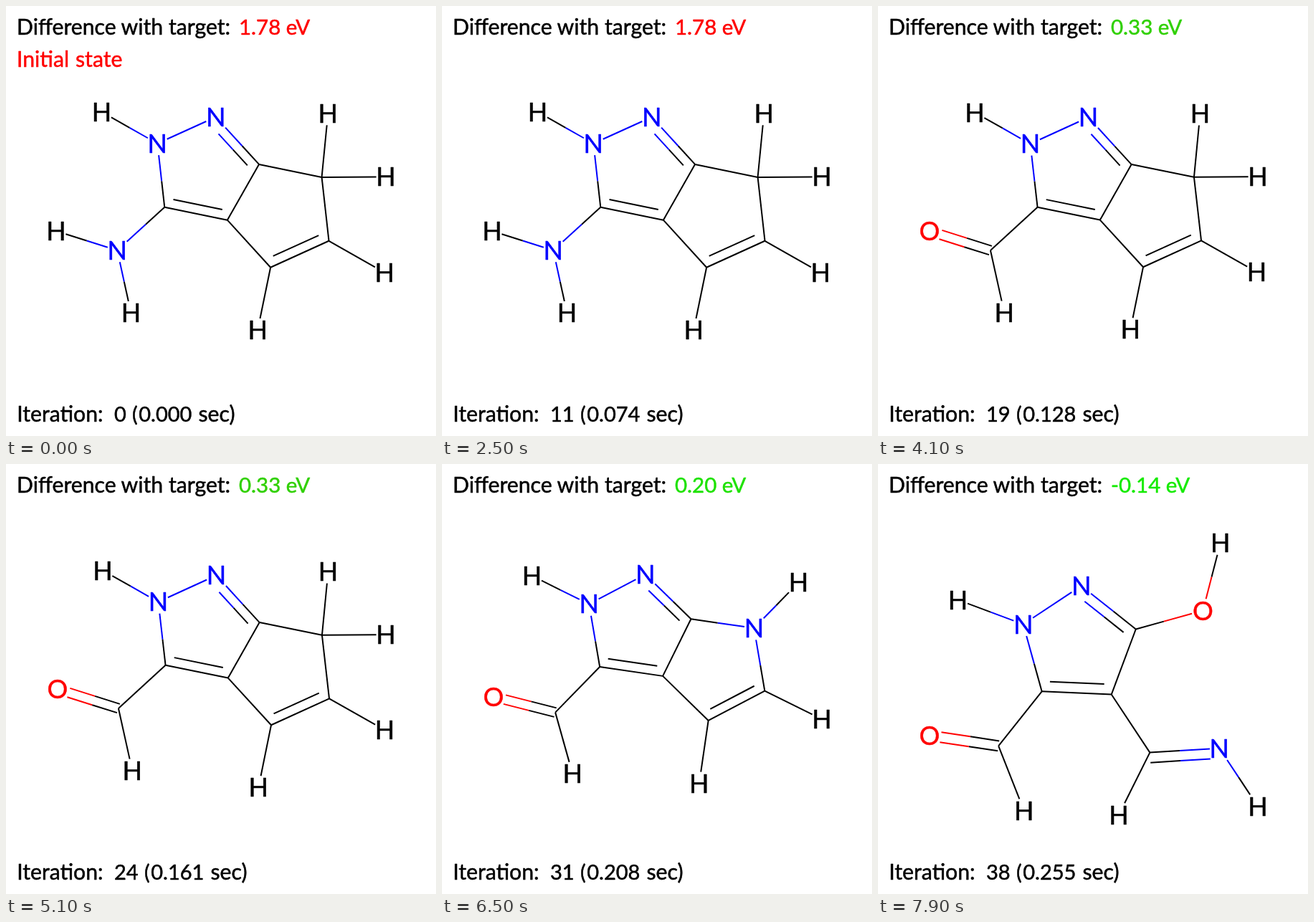
Write an HTML page with a canvas that moves like this. It is 600 px wide and 600 px high and loops after 8000 ms.

```html
<!DOCTYPE html>
<html lang="en">
<head>
<meta charset="utf-8">
<title>Molecule search</title>
<style>
  html, body { margin: 0; width: 100%; height: 100%; overflow: hidden; background: #fff; }
  canvas { display: block; width: 600px; height: 600px; }
</style>
</head>
<body>
<canvas id="stage" width="600" height="600"></canvas>
<script>
const ctx = document.getElementById('stage').getContext('2d');
const LOOP = 8000, FIRST = 500, STEP = 200, SEC_PER_STEP = 0.00672;
const WORST = 1.78;
const COLORS = { N: '#0000ff', O: '#ff0000', H: '#000', C: '#000' };
const HALF_WIDTH = { N: 10, O: 12, H: 10, C: 0 };

// Each atom: element, parent, bond mark, bond angle. All bonds have length 1.
// Marks: - single, = centred double, < and > ring double (left, right), / one-sided double
const PYRAZOLE = 'C, C 0 < 0, C 1 - -72, N 2 < -144, N 3 - 144, H 4 - 198, ';
const AMINE = 'N 0 - 126, H 6 - 186, H 6 - 66, ';
const ALDEHYDE = 'C 0 - 126, O 6 = 186, H 6 - 66, ';
const CYCLOPENTADIENE = 'C 2 - 0, C 9 - 72, C 10 > 144, H 10 - 18, H 11 - 90, H 9 - -96, H 9 - -12';
const PYRROLE = 'N 2 - 0, C 9 - 72, C 10 > 144, H 10 - 18, H 11 - 90, H 9 - -54';
const OPENED = 'O 2 - -18, C 1 - 54, N 10 / -6, H 11 - 54, H 10 - 114, H 9 - -78';
const ONE_RING = [[4, 0]], TWO_RINGS = [[4, 0], [11, 1]];

// Scales the atoms so that their labels fill x = 60..540, centred vertically
function fit(atoms) {
  const byX = [...atoms].sort((p, q) => p.x - q.x);
  const first = byX[0], last = byX[byX.length - 1];
  const left = 60 + HALF_WIDTH[first.el], right = 540 - HALF_WIDTH[last.el];
  const scale = (right - left) / (last.x - first.x);
  const ys = atoms.map(p => p.y);
  const midY = (Math.min(...ys) + Math.max(...ys)) / 2, minX = first.x;
  for (const p of atoms) {
    p.x = left + (p.x - minX) * scale;
    p.y = 300 + (p.y - midY) * scale;
  }
}

function molecule(from, gap, tilt, parts, closures) {
  const atoms = [], bonds = [];
  for (const part of parts.split(', ')) {
    const [el, parent, kind, angle] = part.split(' ');
    const atom = { el, x: 0, y: 0 };
    if (parent) {
      const base = atoms[parent], dir = (tilt + Number(angle)) * Math.PI / 180;
      atom.x = base.x + Math.cos(dir);
      atom.y = base.y + Math.sin(dir);
      bonds.push([base, atom, kind]);
    }
    atoms.push(atom);
  }
  for (const [i, j] of closures) bonds.push([atoms[i], atoms[j], '-']);
  fit(atoms);
  return { from, gap, atoms, bonds };
}

const molecules = [
  molecule(0, 1.78, 11.6, PYRAZOLE + AMINE + CYCLOPENTADIENE, TWO_RINGS),
  molecule(16, 0.33, 11.5, PYRAZOLE + ALDEHYDE + CYCLOPENTADIENE, TWO_RINGS),
  molecule(28, 0.20, 8.3, PYRAZOLE + ALDEHYDE + PYRROLE, TWO_RINGS),
  molecule(34, -0.14, 2.5, PYRAZOLE + ALDEHYDE + OPENED, ONE_RING)
];

// Distance along (ux, uy) needed to leave the label's box
function clearance(atom, ux, uy) {
  if (atom.el === 'C') return 0;
  const w = HALF_WIDTH[atom.el] + 3.4;
  return Math.min(w / Math.abs(ux), 16.3 / Math.abs(uy));
}

function line(x1, y1, x2, y2, color) {
  ctx.strokeStyle = color;
  ctx.beginPath();
  ctx.moveTo(x1, y1);
  ctx.lineTo(x2, y2);
  ctx.stroke();
}

function drawBond(a, b, kind) {
  const dx = b.x - a.x, dy = b.y - a.y, len = Math.hypot(dx, dy);
  const ux = dx / len, uy = dy / len;
  const start = clearance(a, ux, uy), end = len - clearance(b, ux, uy);
  const spread = len * 0.145, trim = len * 0.11;

  const strand = (shift, s, e) => {
    const at = d => [a.x + ux * d - uy * shift, a.y + uy * d + ux * shift];
    const p = at(s), m = at((s + e) / 2), q = at(e);
    const ca = COLORS[a.el], cb = COLORS[b.el];
    if (ca === cb) return line(...p, ...q, ca);
    line(...p, ...m, ca);
    line(...m, ...q, cb);
  };

  if (kind === '=') {
    strand(spread / 2, start, end);
    strand(-spread / 2, start, end);
    return;
  }
  strand(0, start, end);
  if (kind === '/') strand(spread, start, end);
  if (kind === '<' || kind === '>') {
    strand(kind === '>' ? spread : -spread, start || trim, b.el === 'C' ? end - trim : end);
  }
}

// A hairline outline gives the letters a slightly stronger weight
function put(text, x, y, color = '#000', size = 30.2) {
  ctx.font = size + 'px Lato, sans-serif';
  ctx.fillStyle = ctx.strokeStyle = color;
  ctx.lineWidth = 0.5;
  ctx.lineJoin = 'round';
  ctx.fillText(text, x, y);
  ctx.strokeText(text, x, y);
}

// Word whose last "ti" is joined at the crossbar
function putJoined(text, x, y, color = '#000') {
  put(text, x, y, color);
  const k = text.lastIndexOf('ti');
  const left = x + ctx.measureText(text.slice(0, k)).width + 6;
  const right = x + ctx.measureText(text.slice(0, k + 1)).width + 4.5;
  ctx.fillRect(left, y - 15.3, right - left, 2.4);
}

function drawMolecule({ atoms, bonds }) {
  ctx.lineWidth = 2;
  for (const bond of bonds) drawBond(...bond);
  ctx.textAlign = 'center';
  for (const { el, x, y } of atoms) {
    if (el !== 'C') put(el, x, y + 13, COLORS[el], 36);
  }
  ctx.textAlign = 'left';
}

function gapColor(gap) {
  const share = Math.min(1, Math.abs(gap) / WORST);
  const red = Math.round(255 * share);
  return `rgb(${red}, ${255 - red}, 0)`;
}

function draw(t) {
  const step = t < FIRST ? 0 : Math.floor((t - FIRST) / STEP) + 1;
  const current = molecules.filter(m => m.from <= step).pop();

  ctx.fillStyle = '#fff';
  ctx.fillRect(0, 0, 600, 600);
  drawMolecule(current);

  put('Difference', 15, 39.5);
  put('with', 160.5, 39.5);
  put('target:', 227, 39.5);
  put(current.gap.toFixed(2) + ' eV', 325, 39.5, gapColor(current.gap), 29.5);
  if (step === 0) {
    putJoined('Initial', 15, 84.5, '#ff0000');
    put('state', 97, 84.5, '#ff0000');
  }

  const shift = step > 9 ? 17 : 0;
  putJoined('Iteration:', 15.2, 579.5);
  put(String(step), 151, 579.5, '#000', 29);
  put('(', 176 + shift, 579.5, '#000', 29);
  put((step * SEC_PER_STEP).toFixed(3), 185.3 + shift, 579.5, '#000', 29);
  put('sec)', 268.5 + shift, 579.5);
}

function tick() {
  draw(performance.now() % LOOP);
  requestAnimationFrame(tick);
}
tick();
</script>
</body>
</html>
```
